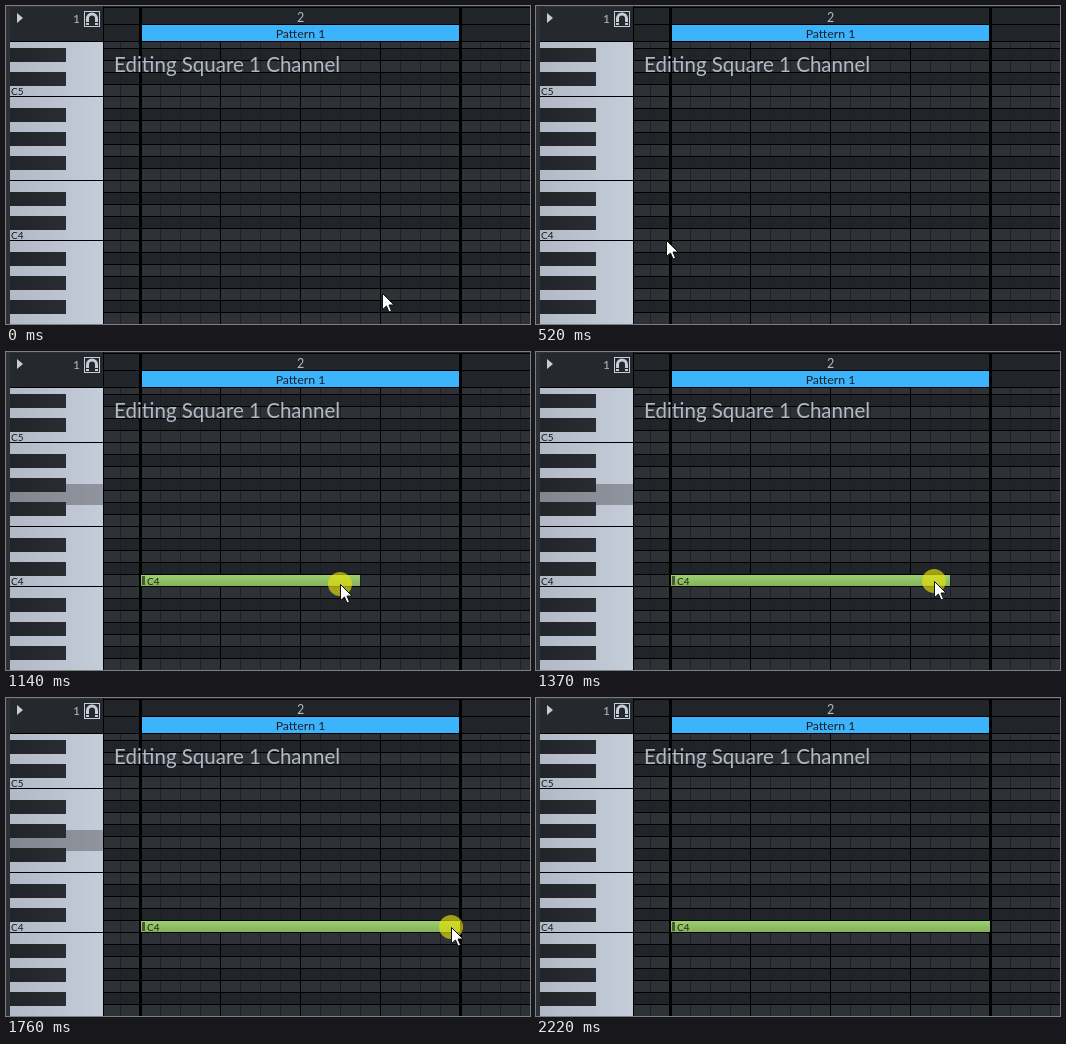
Write an HTML page with a canvas that moves like this. It is 524x318 px and loops after 2.68 s.

```html
<!DOCTYPE html>
<html>
<head>
<meta charset="utf-8">
<style>
  html, body { margin: 0; width: 100%; height: 100%; overflow: hidden; background: #212529; }
  canvas { display: block; }
</style>
</head>
<body>
<canvas id="stage" width="524" height="318"></canvas>
<script>
const ctx = document.getElementById('stage').getContext('2d');
const LOOP = 2680, TICK = 76;
// Moments of the gesture, in ticks.
const PRESS = 9, RELEASE = 25, HOVER = 26, LEAVE = 27, GONE = 29;
const DARK = '#212529', LIGHT = '#2e3236', PANEL = '#25292d', LINE = '#000';
const PALE = '#b2b9c6', BRIGHT = '#c6cdda', INK = '#15181a';
const KEYS_LEFT = 4, KEYS_RIGHT = 97, ROW = 12, STEP = 20, START = 134;

// Turning points of the pointer: tick, x, y.
const PATH = [
  [0, 376, 287], [6, 99, 216], [7, 130, 234], [8, 142, 231], [12, 143, 230], [15, 334, 232],
  [19, 410, 229], [20, 410, 229], [23, 445, 229], [26, 445, 229], [28, 488, 296]
];

function pointerAt(tick) {
  const next = PATH.findIndex(point => point[0] > tick);
  if (next < 0) return PATH.at(-1).slice(1);
  const [t0, x0, y0] = PATH[next - 1], [t1, x1, y1] = PATH[next];
  const u = (tick - t0) / (t1 - t0), ease = u * u * (3 - 2 * u);
  return [x0 + (x1 - x0) * ease, y0 + (y1 - y0) * ease].map(Math.round);
}

function rect(x, y, w, h, color) {
  ctx.fillStyle = color;
  ctx.fillRect(x, y, w, h);
}

function text(str, x, y, size, color, align = 'left') {
  ctx.font = `${size}px Lato, sans-serif`;
  ctx.textAlign = align;
  ctx.fillStyle = color;
  ctx.fillText(str, x, y);
}

function gradient(x0, y0, x1, y1, from, to) {
  const g = ctx.createLinearGradient(x0, y0, x1, y1);
  g.addColorStop(0, from);
  g.addColorStop(1, to);
  return g;
}

function polygon(points, fill, stroke) {
  ctx.beginPath();
  points.forEach(([x, y]) => ctx.lineTo(x, y));
  ctx.closePath();
  ctx.fillStyle = fill;
  ctx.fill();
  if (stroke) {
    ctx.strokeStyle = stroke;
    ctx.lineWidth = 1;
    ctx.stroke();
  }
}

// Visits each semitone row, counted down from B.
function eachRow(draw) {
  for (let k = -5; k < 20; k++) draw(91 + k * ROW, (k + 12) % 12);
}

const isSharp = note => note < 6 ? note % 2 === 1 : note === 8 || note === 10;

function drawGrid() {
  rect(0, 0, 524, 318, LIGHT);
  eachRow((y, note) => { if (isSharp(note)) rect(98, y, 426, ROW, DARK); });
  for (let x = 114; x < 524; x += STEP) rect(x, 36, 1, 282, '#1d2124');
  eachRow(y => rect(98, y + 11, 426, 1, LINE));
  for (let x = START; x < 454; x += 4 * STEP) rect(x, 36, 1, 282, LINE);
}

function drawHeader() {
  rect(98, 0, 426, 36, DARK);
  for (const y of [1, 18, 35]) rect(98, y, 426, 1, LINE);
  rect(136, 19, 317, 16, '#3db3fc');
  for (const x of [START, 454]) rect(x - 1, 1, 3, 317, LINE);
  text('2', 294.5, 16, 12.5, PALE, 'center');
  text('Pattern 1', 294.5, 32, 12.3, '#16222b', 'center');
  text('Editing Square 1 Channel', 108, 66, 20.5, PALE);
}

function drawPiano(pressed) {
  rect(KEYS_LEFT, 36, 93, 282, gradient(KEYS_LEFT, 0, KEYS_RIGHT, 0, PALE, BRIGHT));
  if (pressed) rect(KEYS_LEFT, 132, 93, 21, 'rgba(0,0,0,.28)');
  eachRow((y, note) => {
    if (note === 0 || note === 7) rect(KEYS_LEFT, y - 1, 93, 1, LINE);
    if (isSharp(note))
      rect(KEYS_LEFT, y - 1, 56, 14, gradient(KEYS_LEFT, 0, KEYS_RIGHT, 0, DARK, LIGHT));
  });
  text('C5', 5, 89, 10, INK);
  text('C4', 5, 233, 10, INK);
  rect(KEYS_RIGHT, 0, 1, 318, LINE);
}

function drawSnapPanel() {
  rect(KEYS_LEFT, 1, 93, 35, PANEL);
  rect(KEYS_LEFT, 35, 93, 1, LINE);
  polygon([[11, 7], [17, 12], [11, 17]], BRIGHT);
  text('1', 67, 17, 12, PALE);
  ctx.strokeStyle = BRIGHT;
  ctx.lineWidth = 1;
  ctx.strokeRect(78.5, 5.5, 15, 15);
  ctx.lineWidth = 3;
  ctx.beginPath();
  ctx.moveTo(81.5, 19);
  ctx.arc(86, 12.5, 4.5, Math.PI, 0);
  ctx.lineTo(90.5, 19);
  ctx.stroke();
  rect(80, 16, 12, 1, PANEL);
}

function drawNote(end, selected) {
  rect(135, 223, end - 135, 11, gradient(0, 223, 0, 234, '#9bd070', '#86b05b'));
  rect(136, 224, 3, 9, '#46592f');
  if (end > START + STEP) text('C4', 141, 233, 10, '#1c2614');
  if (selected) {
    ctx.strokeStyle = '#fff';
    ctx.lineWidth = 2;
    ctx.strokeRect(134, 222, 320, 12);
  }
}

function drawClick(x, y) {
  ctx.beginPath();
  ctx.arc(x, y, 12, 0, Math.PI * 2);
  ctx.fillStyle = 'rgba(230,225,8,.66)';
  ctx.fill();
}

function drawArrow(x, y) {
  const outline = [[0, 0], [0, 16], [4, 12.5], [6.5, 18.5], [9, 17.5], [6.5, 11.5], [11.5, 11.5]];
  polygon(outline.map(([dx, dy]) => [x + dx + .5, y + dy + .5]), '#fff', '#111');
}

function drawMove(x, y) {
  const arm = [[-1.5, -1.5], [-1.5, -6], [-4.5, -6], [0, -10.5], [4.5, -6], [1.5, -6]];
  const points = [];
  for (let i = 0; i < 4; i++) {
    const c = Math.cos(i * Math.PI / 2), s = Math.sin(i * Math.PI / 2);
    for (const [a, b] of arm) points.push([x + .5 + a * c - b * s, y + .5 + a * s + b * c]);
  }
  polygon(points, '#fff', '#111');
}

function render(time) {
  const tick = Math.floor((time + 20) / TICK);
  const [x, y] = pointerAt(tick);
  const pressed = tick >= PRESS && tick < RELEASE;
  const hover = tick >= HOVER && tick < LEAVE;
  drawGrid();
  drawHeader();
  drawPiano(pressed);
  drawSnapPanel();
  if (tick >= PRESS) {
    const steps = Math.min(16, Math.floor((x - START) / STEP) + 1);
    drawNote(START + steps * STEP, hover);
  }
  if (pressed) drawClick(x, y);
  if (hover) drawMove(x, y);
  else if (tick < GONE) drawArrow(x, y);
}

function animate() {
  render(performance.now() % LOOP);
  requestAnimationFrame(animate);
}
animate();
</script>
</body>
</html>
```
